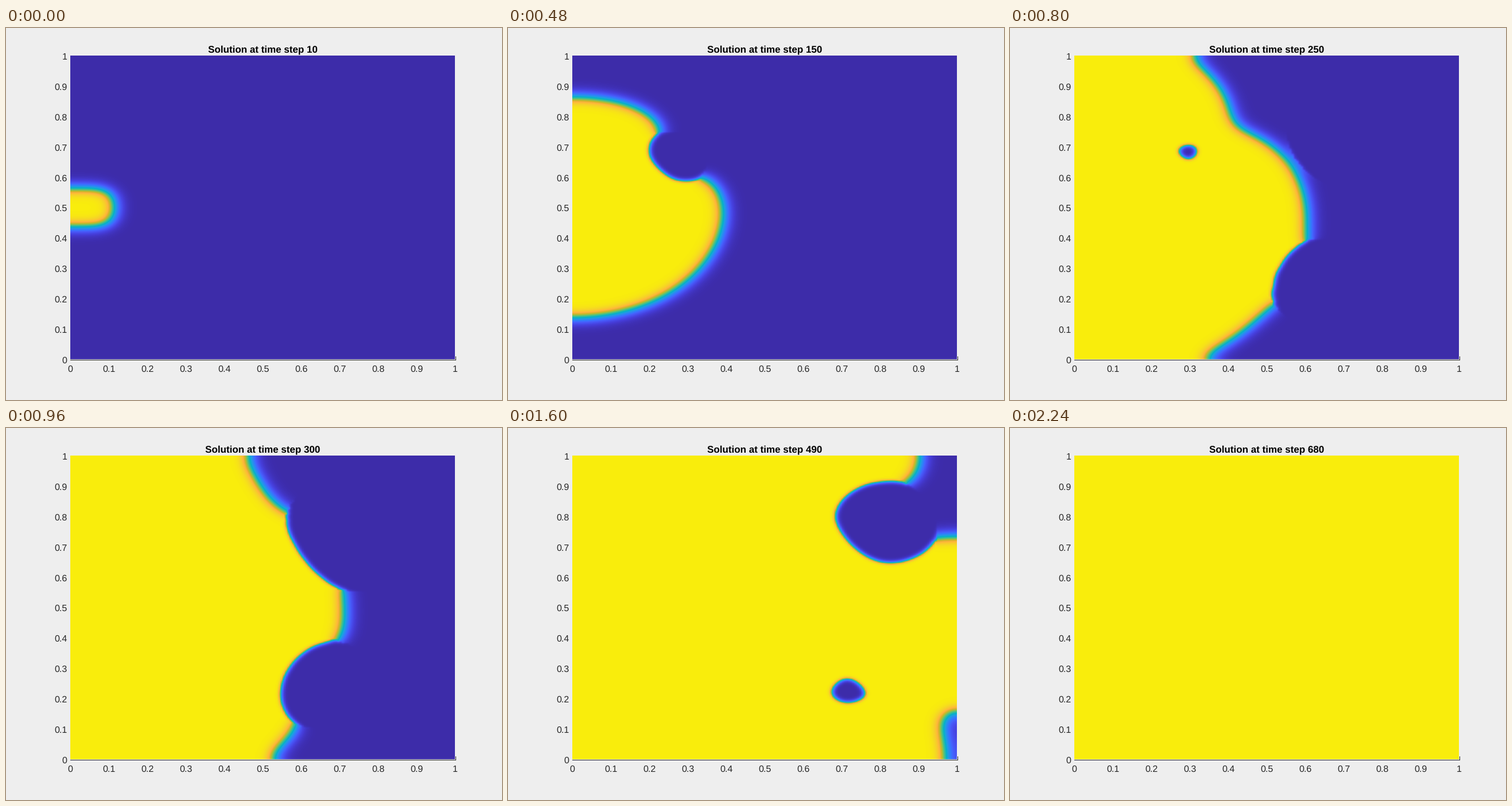
Write a matplotlib script that moves like this. It is 864 by 648 pixels and loops after 2.32 s.

```python
import matplotlib.pyplot as plt
import numpy as np
from matplotlib.animation import FuncAnimation
from matplotlib.colors import LinearSegmentedColormap

W, H = 864, 648
LEFT, RIGHT, TOP, BOTTOM = 112.2, 782, 48.6, 577.3
FRAMES, INTERVAL = 29, 80

# Bistable reaction-diffusion: u_t = div(D grad u) - A u (u - THRESH)(u - 1)
N = 170
DT = 0.05
A, THRESH = 18.515, 0.2383
D_FAST = 9.5298e-4
D_SLOW = 0.088 * D_FAST
DISKS = [(0.25, 0.65, 0.10), (0.65, 0.25, 0.15), (0.75, 0.75, 0.20)]

STOPS = [(0, "#3d2ca9"), (4, "#453bd5"), (8, "#484ff0"), (12, "#4563fd"),
         (15, "#3874fe"), (18, "#2e83f7"), (22, "#2596e8"), (26, "#18a6db"),
         (29, "#01afca"), (32, "#19b6b6"), (36, "#37be97"), (40, "#64c36f"),
         (44, "#9dbf42"), (48, "#d1b626"), (51, "#f0b136"), (53, "#feb53c"),
         (56, "#fcc52f"), (59, "#f5d626"), (63, "#f9ed0c")]
CMAP = LinearSegmentedColormap.from_list("heat", [(p / 63, c) for p, c in STOPS])

centers = (np.arange(N) + 0.5) / N
faces = np.arange(1, N) / N


def coupling(xs, ys):
    """Scaled diffusivity at the cell faces, lower inside the disks."""
    x, y = np.meshgrid(xs, ys)
    d = np.full(x.shape, D_FAST)
    for cx, cy, r in DISKS:
        d[np.hypot(x - cx, y - cy) < r] = D_SLOW
    return DT * N * N * d


KX = coupling(faces, centers)
KY = coupling(centers, faces)


def implicit(u):
    out = u.copy()
    fx = KX * (u[:, 1:] - u[:, :-1])
    fy = KY * (u[1:] - u[:-1])
    out[:, :-1] -= fx
    out[:, 1:] += fx
    out[:-1] -= fy
    out[1:] += fy
    return out


def solve(rhs, x, tol=1e-6):
    """Conjugate gradients for implicit(x) = rhs."""
    r = rhs - implicit(x)
    p, rr = r.copy(), np.vdot(r, r)
    for _ in range(25):
        if rr < tol:
            break
        q = implicit(p)
        alpha = rr / np.vdot(p, q)
        x = x + alpha * p
        r = r - alpha * q
        rr, old = np.vdot(r, r), rr
        p = r + rr / old * p
    return x


def simulate(steps):
    x, y = np.meshgrid(centers, centers)
    u = ((x < 0.1) & (abs(y - 0.5) < 0.047)).astype(float)
    shots = {}
    for n in range(1, max(steps) + 1):
        u = solve(u - DT * A * u * (u - THRESH) * (u - 1), u)
        if n in steps:
            shots[n] = u
    return shots


STEPS = [10 * (1 + round(2.4 * k)) for k in range(FRAMES)]
shots = simulate(set(STEPS))

plt.rcParams.update({"font.family": "Liberation Sans", "text.hinting": "none"})
fig = plt.figure(figsize=(W / 72, H / 72), dpi=72, facecolor="#eeeeee")
ax = fig.add_axes([0, 0, 1, 1])
image = ax.imshow(shots[STEPS[0]], cmap=CMAP, vmin=0, vmax=1, origin="lower",
                  extent=(LEFT, RIGHT, BOTTOM, TOP), aspect="auto",
                  interpolation="bilinear")
ax.set_xlim(0, W)
ax.set_ylim(H, 0)
ax.axis("off")

INK = "#262626"
ax.plot([LEFT, 782.5], [577.5, 577.5], color=INK, lw=1)
ax.plot([782.5, 782.5], [577.5, 571.5], color=INK, lw=1)
for i in range(11):
    label = f"{i / 10:g}"
    x = LEFT + (RIGHT - LEFT) * i / 10
    y = BOTTOM + (TOP - BOTTOM) * i / 10
    ax.text(x, 599.3, label, size=16, color=INK, ha="center", va="baseline")
    ax.text(106.3, y + 6.3, label, size=16, color=INK, ha="right", va="baseline")
title = ax.text(447.2, 42.6, "", size=17, weight="bold", color="black",
                ha="center", va="baseline")


def update(k):
    image.set_data(shots[STEPS[k]])
    title.set_text(f"Solution at time step {STEPS[k]}")
    return image, title


anim = FuncAnimation(fig, update, frames=FRAMES, interval=INTERVAL,
                     repeat=True, repeat_delay=0, blit=False)
plt.show()
```
